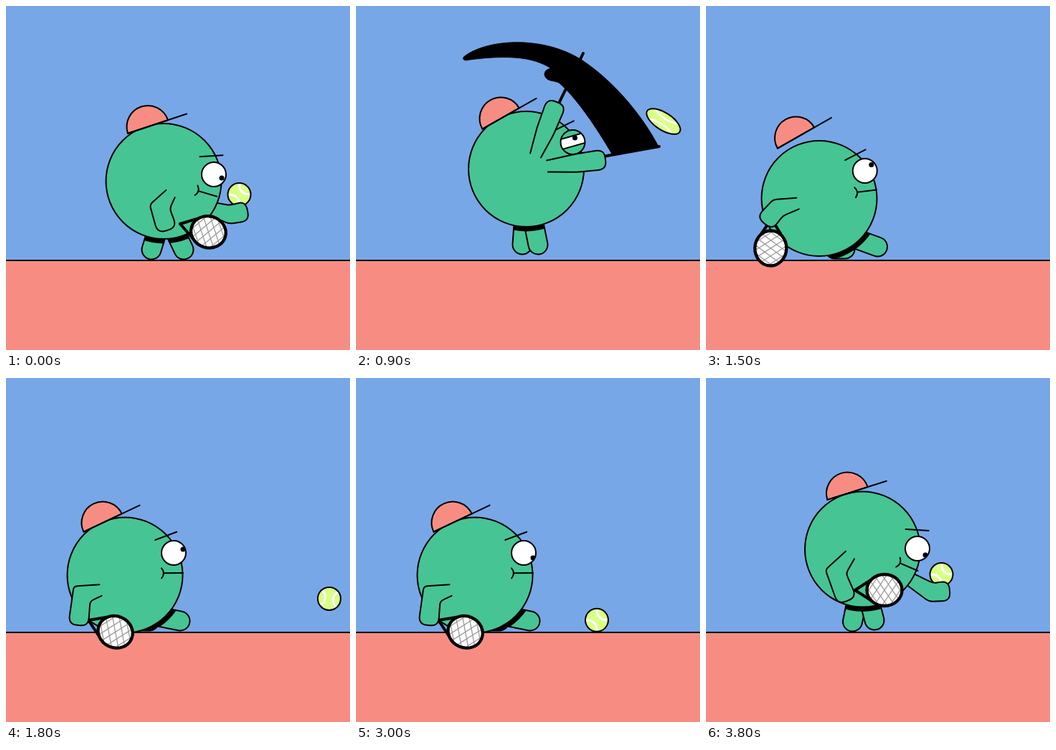
An HTML page with a canvas that plays this animation: 480 by 480 pixels, repeating every 3900 ms.

```html
<!DOCTYPE html>
<html lang="en">
<head>
<meta charset="utf-8">
<title>Tennis serve</title>
<style>
  html, body { margin: 0; width: 100%; height: 100%; overflow: hidden; background: #78a7e8; }
  canvas { display: block; width: 100vw; height: 100vh; }
</style>
</head>
<body>
<canvas id="stage" width="480" height="480"></canvas>
<script>
const ctx = document.getElementById('stage').getContext('2d');
const STEP = 100, STEPS = 39;
const SKY = '#78a7e8', CLAY = '#f78d82', GREEN = '#47c494', LIME = '#d9ff86', INK = '#000';
const RADIUS = 80.5, HIT = 9, SMACK = 12, REST = 30, GRAB = 36;

// hat: offset and tilt; eye: offset; look: pupil; lids: upper and lower edge;
// arm: shoulder, elbow, hand; far: elbow, hand; racket: grip and angle.
const ready = {
  body: [220, 244.5], hat: [-22, -76, -18.4], eye: [70, -9.5], look: [11, 5], lids: [-20, 20],
  feet: [203, 340, 248, 340], arm: [229.5, 262, 214.5, 280, 225, 313],
  racket: [243, 304, 16], far: [312, 291, 337, 286]
};
const glance = { ...ready, look: [12, -1] };
const windup = {
  ...ready, body: [214, 238], hat: [-35, -71, -29], eye: [64, -36], look: [8, -10],
  arm: [190, 233, 155, 212, 115, 190], racket: [122, 186, -100], far: [300, 190, 330, 160]
};
const swing = {
  body: [237.5, 227.5], hat: [-35.5, -70.5, -29.5], eye: [65, -37.5], look: [3, -6],
  lids: [-8.5, 5.5], feet: [232, 333, 254, 333], arm: [267, 223.5, 305, 219.5, 348, 214],
  racket: [347, 210, -11], far: [190, 250, 205, 250]
};
const hit = {
  ...swing, body: [219.5, 238], hat: [-22, -94.5, -31], eye: [59.5, -46], look: [5, -12],
  lids: [-20, 3], feet: [212, 341, 282, 319], arm: [172, 253, 149, 260, 162, 316],
  racket: [170, 306, 23.5]
};
const fling = {
  ...hit, body: [150, 262], hat: [-34, -96, -34], lids: [-20, 20], feet: [188, 339, 236, 333],
  arm: [124, 255, 95, 262, 62, 262], racket: [68, 256, 160]
};
const sit = {
  ...fling, body: [166, 275], hat: [-31, -73, -25.4], eye: [68, -31], look: [13, -5],
  feet: [200, 339, 243, 339], arm: [132, 296, 106, 301, 101, 345], racket: [115, 338, 23.5]
};
const watch = { ...sit, look: [13, 7] };
const bend = {
  ...sit, body: [176.5, 240], hat: [-35, -72.5, -25.4], eye: [75.5, 20.5], look: [10, 10],
  feet: [172, 341, 221, 338], arm: [154, 277, 149, 315, 145, 356],
  racket: [163, 352, 1], far: [258, 292, 287, 310]
};
const grab = { ...bend, body: [200, 251], feet: [186, 341, 228, 339], far: [305, 315, 345, 358] };
const lift = {
  ...bend, body: [218.5, 239], hat: [-21, -78, -17.6], eye: [76.5, -1], look: [11, 9],
  feet: [204.5, 340, 235, 338], arm: [201, 247, 181, 270, 197, 311],
  racket: [208, 296, 0], far: [314, 299, 340, 297]
};
const timeline = [
  [0, ready], [3, glance], [4, glance], [7, windup], [HIT, swing], [SMACK, hit], [14, fling],
  [16, sit], [18, sit], [28, watch], [REST, watch], [34, bend], [GRAB, grab], [38, lift]
];

const ease = p => p * p * (3 - 2 * p);
const mix = (a, b, p) => a + (b - a) * p;
const rad = d => d * Math.PI / 180;

function poseAt(s) {
  const next = timeline.findIndex(([key]) => key > s);
  if (next < 0) return lift;
  const [[k1, a], [k2, b]] = timeline.slice(next - 1, next + 1);
  const p = ease((s - k1) / (k2 - k1)), pose = {};
  for (const part in a) pose[part] = a[part].map((v, i) => mix(v, b[part][i], p));
  return pose;
}

// Height above the ground for a ball whose bounces shrink.
function bounce(t) {
  let span = 8, height = 70;
  while (t > span && span > 1) {
    t -= span;
    span *= .62;
    height *= .4;
  }
  return t < span ? 4 * height * t / span * (1 - t / span) : 0;
}

function ballAt(s, hand) {
  const ball = { rx: 16, ry: 16, turn: 0, spin: -45 };
  const put = (x, y, more) => Object.assign(ball, { x, y }, more);
  const long = { rx: 27, ry: 12, turn: 33, spin: 90 };
  if (s <= 5 || s >= GRAB) return put(hand[2] - 11.5, hand[3] - 23);
  if (s < HIT) {
    const p = (s - 5) / 4;
    return put(mix(326, 429, p), mix(250, 161, p) - 480 * p * (1 - p));
  }
  if (s <= HIT + 1) return put(429 + 100 * (s - HIT), 161 + 65 * (s - HIT), long);
  if (s < SMACK) return put(304 + 136 * (SMACK - s), 224, { ...long, turn: 0 });
  if (s === SMACK) return put(304, 224, { rx: 10.5, ry: 24, turn: -8, spin: 0 });
  if (s < 16) {
    const k = s - SMACK;
    return put(304 + 68 * k, 224 - 35 * k + 9 * k * k);
  }
  const roll = 115 * Math.max(0, (REST - s) / 12) ** 1.2;
  return put(336 + roll, 338.5 - bounce(s - 11), { spin: -45 + roll / rad(16) });
}

function paint(path, fill, width = 2) {
  if (fill) { ctx.fillStyle = fill; ctx.fill(path); }
  ctx.strokeStyle = INK;
  ctx.lineWidth = width;
  if (width) ctx.stroke(path);
}

function line(x1, y1, x2, y2, width = 2, color = INK) {
  ctx.strokeStyle = color;
  ctx.lineWidth = width;
  ctx.beginPath();
  ctx.moveTo(x1, y1);
  ctx.lineTo(x2, y2);
  ctx.stroke();
}

function oval(x, y, rx, ry = rx) {
  const p = new Path2D();
  p.ellipse(x, y, rx, ry, 0, 0, 2 * Math.PI);
  return p;
}

function local(x, y, deg, draw) {
  ctx.save();
  ctx.translate(x, y);
  ctx.rotate(rad(deg));
  draw();
  ctx.restore();
}

function drawLeg(fx, fy, bx, by) {
  const dx = (fx - bx) * .6;
  const hx = bx + dx, hy = Math.min(fy, by + Math.sqrt(74 * 74 - dx * dx));
  const a = Math.atan2(fy - hy, fx - hx), q = Math.PI / 2;
  const p = new Path2D();
  p.arc(hx, hy, 13.5, a + q, a - q);
  p.arc(fx, fy, 13.5, a - q, a + q);
  p.closePath();
  paint(p, GREEN);
  ctx.save();
  ctx.clip(p);
  paint(oval(bx, by, 87), INK, 0);
  ctx.restore();
}

// A limb that widens from shoulder to hand, open at the shoulder.
function drawLimb([ax, ay, bx, by, cx, cy]) {
  const normal = (x, y) => [-y / Math.hypot(x, y), x / Math.hypot(x, y)];
  const n1 = normal(bx - ax, by - ay), n2 = normal(cx - bx, cy - by);
  const k = Math.max(.5, 1 + n1[0] * n2[0] + n1[1] * n2[1]);
  const m = [(n1[0] + n2[0]) / k, (n1[1] + n2[1]) / k];
  const side = d => [[ax, ay, n1, 8], [bx, by, m, 12.5], [cx, cy, n2, 14]]
    .map(([x, y, n, w]) => [x + d * w * n[0], y + d * w * n[1]]);
  const pts = [...side(1), ...side(-1).reverse()];
  const toward = (a, b, r) => {
    const t = Math.min(.5, r / Math.hypot(b[0] - a[0], b[1] - a[1]));
    return [mix(a[0], b[0], t), mix(a[1], b[1], t)];
  };
  const p = new Path2D();
  p.moveTo(...pts[0]);
  for (let i = 1; i < 5; i++) {
    const r = i === 2 || i === 3 ? 12 : 5;
    p.lineTo(...toward(pts[i], pts[i - 1], r));
    p.quadraticCurveTo(...pts[i], ...toward(pts[i], pts[i + 1], r));
  }
  p.lineTo(...pts[5]);
  paint(p, GREEN);
}

function drawBall({ x, y, rx, ry, turn, spin }) {
  local(x, y, turn, () => {
    const shape = oval(0, 0, rx, ry);
    paint(shape, LIME, 0);
    ctx.save();
    ctx.clip(shape);
    ctx.scale(rx / 16, ry / 16);
    ctx.rotate(rad(spin));
    ctx.strokeStyle = '#fff';
    ctx.lineWidth = 3.2;
    for (const seam of [-18, 18]) ctx.stroke(oval(seam, 0, 12.5));
    ctx.restore();
    paint(shape);
  });
}

function drawHat([x, y, tilt], bx, by) {
  local(bx + x, by + y, tilt, () => {
    const p = new Path2D();
    p.arc(0, 0, 29.5, Math.PI, 0);
    p.closePath();
    paint(p, CLAY);
    line(-29.5, 0, 57, 0);
  });
}

// Brow, lids and mouth turn with the eye around the body.
function drawFace({ eye: [ex, ey], look, lids: [up, low] }, bx, by, gasp) {
  const x = bx + ex, y = by + ey, turn = Math.atan2(ey, ex) / rad(1);
  local(x, y, turn, () => {
    if (gasp) paint(oval(-8.7, 34, 4.5), INK, 0);
    else local(-24.5, 20, 24, () => {
      line(0, 0, 27, 0);
      paint(new Path2D('M-3-7Q3 0-3 7'));
    });
  });
  const white = oval(x, y, 17);
  paint(white, '#fff', 0);
  ctx.save();
  ctx.clip(white);
  paint(oval(x + look[0], y + look[1], 3.5), INK, 0);
  local(x, y, turn + 14, () => {
    ctx.fillStyle = GREEN;
    ctx.fillRect(-24, -50, 48, 50 + up);
    ctx.fillRect(-24, low, 48, 50);
    line(-24, up, 24, up);
    line(-24, low, 24, low);
  });
  ctx.restore();
  paint(white);
  local(x, y, turn, () => local(0, -26, 4, () => line(-16, 0, 16, 0)));
}

function drawRacket([x, y, turn]) {
  local(x, y, turn, () => {
    line(0, 0, 31, -20, 4);
    line(0, 0, 31, 20, 4);
    const head = oval(41, 0, 24.5, 22);
    paint(head, '#fff', 0);
    ctx.save();
    ctx.clip(head);
    for (let i = -44; i <= 44; i += 11) {
      for (const lean of [-17, 17]) line(41 + i - lean, -25, 41 + i + lean, 25, 1.3, '#9b9b9b');
    }
    ctx.restore();
    paint(head, null, 4.3);
  });
}

const smear = new Path2D('M153 69C185 46 262 41 316 76C358 104 398 150 422 196L358 208' +
  'C336 170 306 126 283 107C274 103 266 106 263 96C263 91 266 88 272 87' +
  'C248 71 212 68 158 75C149 78 147 72 153 69Z');

function drawSwing() {
  paint(smear, INK, 1);
  line(282, 138, 317, 66, 4);
  line(345, 210, 423, 196, 4);
  drawLimb([250.5, 208.5, 264, 175, 280, 134]);
}

// Short strokes fanning out from the smacked face.
function drawImpact() {
  for (let i = 0; i < 4; i++) {
    local(294, 223, -70 + i * 37, () => line(33, 0, 44, 0));
  }
}

function draw(s) {
  ctx.lineCap = ctx.lineJoin = 'round';
  ctx.fillStyle = SKY;
  ctx.fillRect(0, 0, 480, 480);
  ctx.fillStyle = CLAY;
  ctx.fillRect(0, 355, 480, 125);
  line(-2, 355, 482, 355);

  const pose = poseAt(s), [bx, by] = pose.body, [f1x, f1y, f2x, f2y] = pose.feet;
  const ball = ballAt(s, pose.far), inFront = s > HIT && s < 34;
  if (!inFront) drawBall(ball);
  drawLimb([bx + 55, by + 35, ...pose.far]);
  drawLeg(f1x, f1y, bx, by);
  drawLeg(f2x, f2y, bx, by);
  paint(oval(bx, by, RADIUS), GREEN);
  drawHat(pose.hat, bx, by);
  drawFace(pose, bx, by, s >= SMACK && s <= 14);
  if (s === HIT) drawSwing(); else drawRacket(pose.racket);
  drawLimb(pose.arm);
  if (inFront) drawBall(ball);
  if (s === SMACK) drawImpact();
}

const start = performance.now();
function tick() {
  draw(Math.floor((performance.now() - start) / STEP) % STEPS);
  requestAnimationFrame(tick);
}
tick();
</script>
</body>
</html>
```
